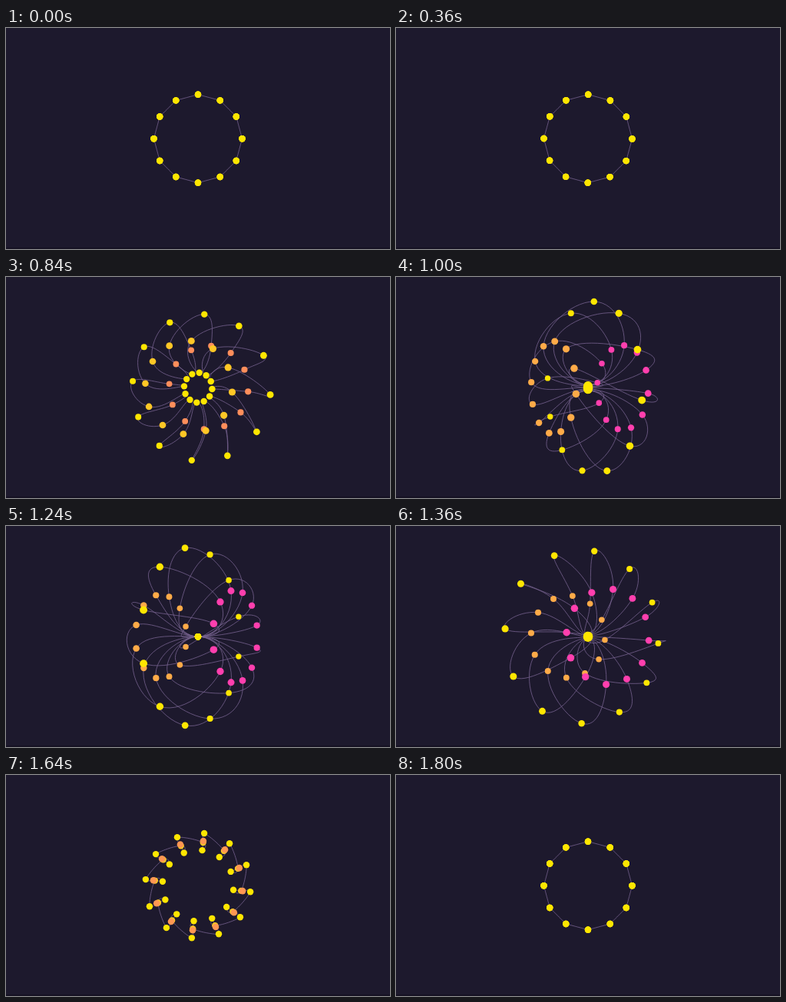
Animation, 500 px wide and 288 px high, one loop 2040 ms. Source, as an HTML page with a canvas:

```html
<!DOCTYPE html>
<html lang="en">
<head>
<meta charset="utf-8">
<title>Turning coil</title>
<style>
  html, body { margin: 0; width: 100%; height: 100%; overflow: hidden; background: #1d192d; }
  canvas { display: block; }
</style>
</head>
<body>
<canvas id="stage" width="500" height="288"></canvas>
<script>
const ctx = document.getElementById('stage').getContext('2d');
const LOOP = 2040, STEP = 40;
const CX = 250, CY = 144.2;
const SECTORS = 12, RING = 57.5, FOCUS = 640, DOT = 4.2;
const SAMPLES = 14;
const YELLOW = [255, 230, 0], PINK = [255, 63, 174], ORANGE = [255, 171, 72];
// Around the tube: outer, back, inner, front.
const TINTS = [YELLOW, PINK, YELLOW, ORANGE];

const progress = (t, from, to) => Math.min(1, Math.max(0, (t - from) / (to - from)));
const sine = p => 0.5 - 0.5 * Math.cos(Math.PI * p);
const quad = p => p < 0.5 ? 2 * p * p : 1 - 2 * (1 - p) ** 2;
const smooth = p => p * p * (3 - 2 * p);
const mix = (a, b, p) => a + (b - a) * p;

function pose(t) {
  const turn = progress(t, 337, 1770);
  return {
    spin: 2 * Math.PI * mix(sine(turn), quad(turn), 0.35),
    tilt: -Math.PI * smooth(progress(t, 640, 1600)),
    tube: RING * (sine(progress(t, 412, 1120)) - sine(progress(t, 1297, 1780))),
    tint: smooth(progress(t, 690, 980)) - smooth(progress(t, 1490, 1780))
  };
}

function coilPoints({ spin, tube }) {
  const points = [];
  for (let i = 0; i < SECTORS * 4; i++) {
    const angle = spin + Math.floor(i / 4) * 2 * Math.PI / SECTORS;
    const phase = (i % 4) * Math.PI / 2;
    const radius = RING + tube * Math.cos(phase);
    points.push([radius * Math.sin(angle), -radius * Math.cos(angle), -tube * Math.sin(phase)]);
  }
  return points;
}

function project([x, y, z], tilt) {
  const c = Math.cos(tilt), s = Math.sin(tilt);
  const depth = z * c - x * s;
  const scale = FOCUS / (FOCUS - depth);
  return { x: CX + (x * c + z * s) * scale, y: CY + y * scale, depth, scale };
}

// Cardinal spline with loose tangents, close to a round coil.
function splinePoint(p0, p1, p2, p3, u) {
  const v = 1 - u;
  return p1.map((a, k) => {
    const b = p2[k];
    const h1 = a + (b - p0[k]) / 4;
    const h2 = b - (p3[k] - a) / 4;
    return v * v * v * a + 3 * v * v * u * h1 + 3 * v * u * u * h2 + u * u * u * b;
  });
}

function drawThread(points, tilt) {
  const n = points.length;
  ctx.beginPath();
  for (let i = 0; i < n; i++) {
    const near = [n - 1, 0, 1, 2].map(d => points[(i + d) % n]);
    for (let j = 0; j < SAMPLES; j++) {
      const { x, y } = project(splinePoint(...near, j / SAMPLES), tilt);
      ctx.lineTo(x, y);
    }
  }
  ctx.closePath();
  ctx.lineWidth = 0.8;
  ctx.lineJoin = 'round';
  ctx.strokeStyle = '#766290';
  ctx.stroke();
}

function drawDots(points, tilt, tint) {
  points
    .map((p, i) => ({ ...project(p, tilt), color: TINTS[i % 4] }))
    .sort((a, b) => a.depth - b.depth)
    .forEach(({ x, y, scale, color }) => {
      const rgb = color.map((v, k) => Math.round(mix(YELLOW[k], v, tint)));
      ctx.fillStyle = `rgb(${rgb})`;
      ctx.beginPath();
      ctx.arc(x, y, DOT * scale, 0, 2 * Math.PI);
      ctx.fill();
    });
}

function draw() {
  const t = Math.floor((performance.now() % LOOP) / STEP) * STEP;
  const now = pose(t);
  const points = coilPoints(now);
  ctx.fillStyle = '#1d192d';
  ctx.fillRect(0, 0, 500, 288);
  ctx.fillStyle = '#161223';
  ctx.fillRect(0, 286, 500, 2);
  drawThread(points, now.tilt);
  drawDots(points, now.tilt, now.tint);
  requestAnimationFrame(draw);
}
draw();
</script>
</body>
</html>
```
